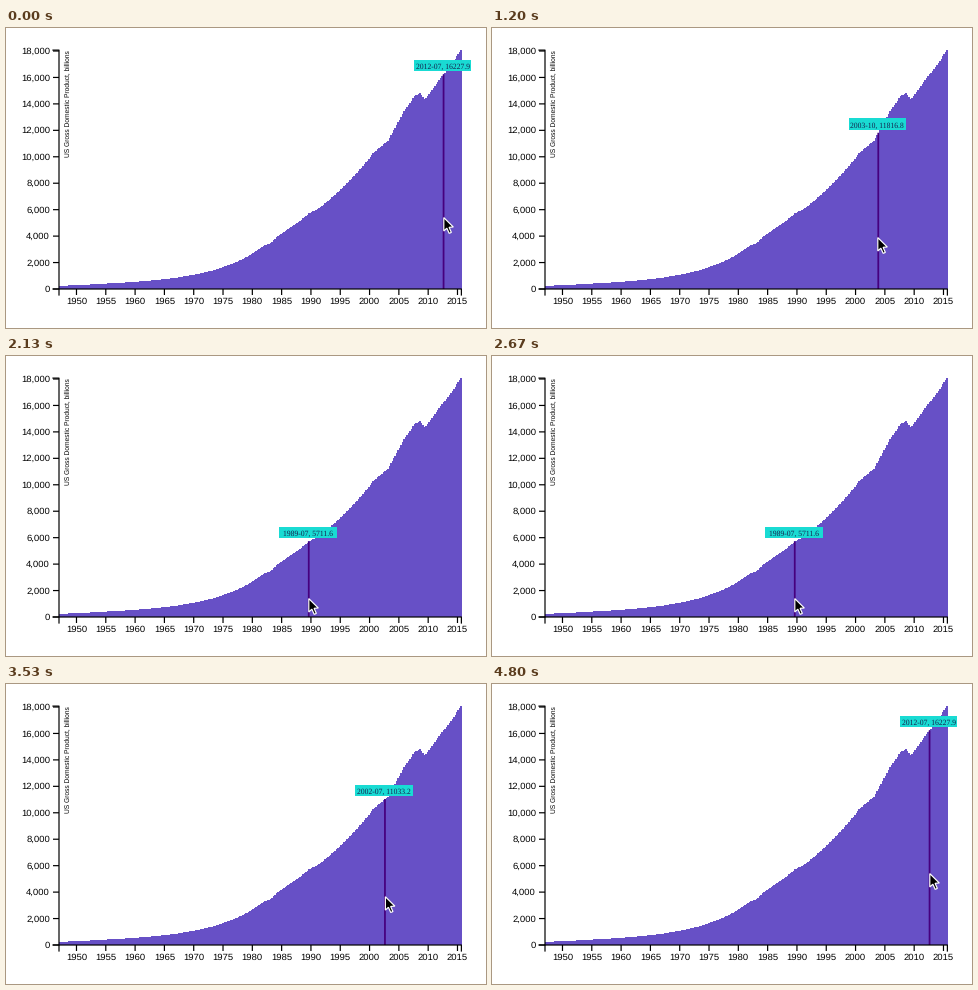
Write a matplotlib script that moves like this. It is 480 px wide and 300 px high and loops after 4.87 s.

```python
import numpy as np
import matplotlib.pyplot as plt
from matplotlib.animation import FuncAnimation
from matplotlib.patches import Polygon, Rectangle

plt.rcParams["text.hinting"] = "none"
plt.rcParams["font.family"] = "Liberation Sans"

W, H, DPI = 480, 300, 100
LOOP, TICK = 4870, 10
STEP = 1000 / 15
LAST = 72
LEFT, BASE, TOP = 52.9, 261, 23
YEAR_W = 5.8615
BAR_W = YEAR_W / 4
COUNT = 275

BAR, HOVER = "#6750c6", "#46007e"
TIP, TIP_TEXT = "#19dbd3", "#14204c"

# Turning points of the curve (year, billions); growth is exponential between.
GROWTH = [
    (1947, 243), (1955, 414), (1960, 543), (1966, 797), (1973, 1380),
    (1978, 2208), (1981.75, 3261), (1983, 3480), (1984.25, 4010),
    (1989.5, 5711.6), (1991, 6035), (1995, 7545.3), (2000.5, 10280),
    (2003, 11230), (2003.75, 11816.8), (2006, 13649), (2007.5, 14569.7),
    (2008.5, 14843), (2009.25, 14340), (2012.5, 16227.9), (2015.5, 18064.7),
]

# Pointer path (step, x, y) for the way out; the way back mirrors it.
PATH = [(1, 437.9, 188), (11, 408, 197), (18, 385.9, 208),
        (26, 334.4, 233), (32, 302.9, 241), (36, 291, 245)]

ARROW = 1.08 * np.array([(0, 0), (0, 12.4), (2.8, 9.8), (5, 14.6),
                         (7, 13.7), (4.9, 9), (8.8, 8.7)]) + (0.4, 1.6)


def pt(px):
    return px * 72 / DPI


def year_x(year):
    return LEFT + (year - 1947) * YEAR_W


def value_y(value):
    return BASE - value * (BASE - TOP) / 18000


years, values = np.transpose(GROWTH)
gdp = np.exp(np.interp(1947 + np.arange(COUNT) / 4, years, np.log(values)))
edges = LEFT + np.arange(COUNT + 1) * BAR_W
right = edges[-1]

fig = plt.figure(figsize=(W / DPI, H / DPI), dpi=DPI, facecolor="white")
ax = fig.add_axes([0, 0, 1, 1])
ax.set_xlim(0, W)
ax.set_ylim(H, 0)
ax.axis("off")

area = ax.stairs(value_y(gdp), edges, baseline=BASE, fill=True,
                 color=BAR, linewidth=0, zorder=1)
area.set_snap(True)

# Axes: the lines with their end ticks, then the labelled ticks.
value_ticks = np.arange(0, 18001, 2000)
year_ticks = np.arange(1950, 2016, 5)
stroke = dict(color="black", lw=pt(1.2), snap=False, zorder=3)
ax.plot([47, 53, 53, 47], [22.1, 22.1, BASE, BASE], **stroke)
ax.plot([53, 53, right - 0.5, right - 0.5], [267, BASE, BASE, 267], **stroke)
ax.hlines(value_y(value_ticks), 47, 53, **stroke)
ax.vlines(year_x(year_ticks), BASE, 267, **stroke)

for value in value_ticks:
    ax.text(44, value_y(value) + 3, f"{value:,}", ha="right",
            va="baseline", fontsize=pt(9.5))
for year in year_ticks:
    ax.text(year_x(year), 276, str(year), ha="center",
            va="baseline", fontsize=pt(9.5))
ax.text(61, 76, "US Gross Domestic Product, billions", rotation=90,
        ha="center", va="center", fontsize=pt(6.7))

hover = ax.add_patch(Rectangle((0, 0), BAR_W + 0.3, 1, color=HOVER, lw=0,
                               snap=False, zorder=2))
tip = ax.add_patch(Rectangle((0, 0), 57.5, 11.2, color=TIP, lw=0, zorder=4))
label = ax.text(0, 0, "", ha="center", va="baseline", color=TIP_TEXT,
                family="Liberation Serif", fontsize=pt(7.7), zorder=5)
pointer = ax.add_patch(Polygon(ARROW, closed=True, facecolor="black",
                               edgecolor="white", lw=pt(1.2),
                               joinstyle="miter", zorder=6))

steps, path_x, path_y = np.transpose(PATH)


def update(frame):
    # Steps start on the 10 ms tick just before their exact time.
    step = int((frame * TICK + 6) / STEP)
    step = min(step, LAST - step)
    px = np.interp(step, steps, path_x)
    py = np.interp(step, steps, path_y)
    pointer.set_xy(ARROW + (px - 0.5, py))

    i = int((px - LEFT) / BAR_W)
    x, y = edges[i], value_y(gdp[i])
    hover.set_xy((x - 0.15, y))
    hover.set_height(BASE - y)
    tip.set_xy((x - 29, y - 14.4))
    label.set_position((x - 0.2, y - 5.4))
    label.set_text(f"{1947 + i // 4}-{i % 4 * 3 + 1:02d}, {gdp[i]:.1f}")
    return hover, tip, label, pointer


anim = FuncAnimation(fig, update, frames=LOOP // TICK, interval=TICK,
                     repeat=True, repeat_delay=0)
plt.show()
```
